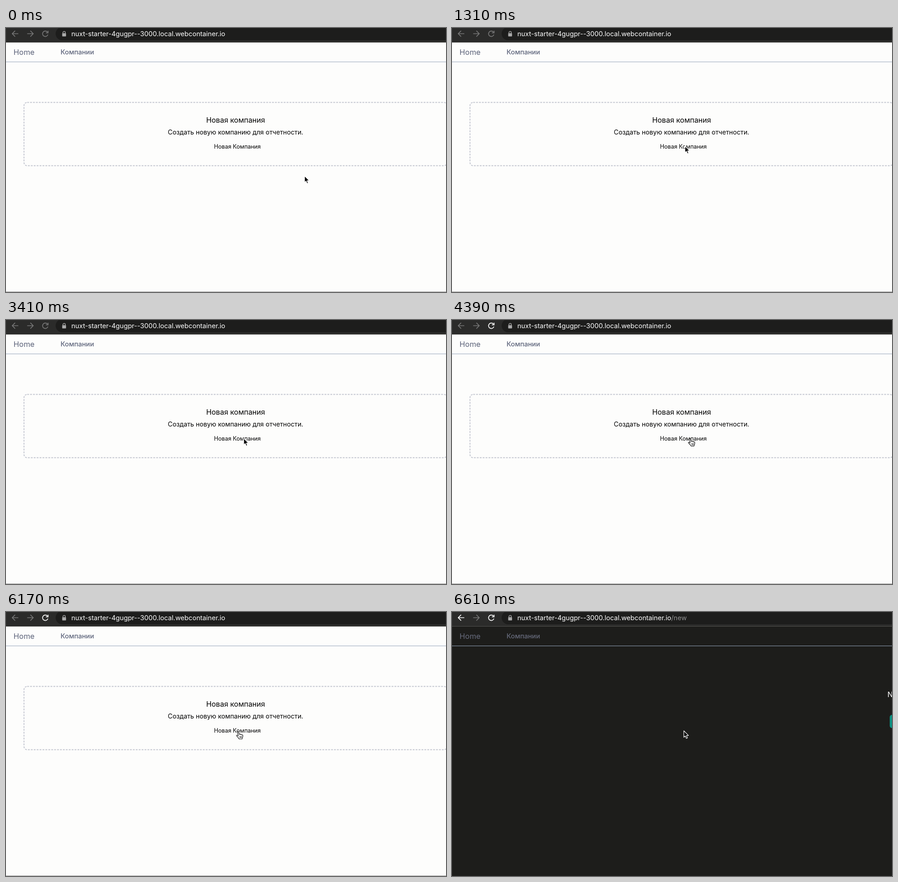
Write an HTML page that moves like this. It is 966 px wide and 580 px high and loops after 8 s.

```html
<!DOCTYPE html>
<html lang="ru">
<head>
<meta charset="utf-8">
<style>
  html, body { margin: 0; width: 100%; height: 100%; overflow: hidden; background: #fdfdfc; }
  svg { display: block; width: 966px; height: 580px; font-family: Inter, "Noto Sans", sans-serif; }
  .icon { fill: none; stroke: #777; stroke-width: 1.7; }
  .icon.on { stroke: #fff; }
  .mid { text-anchor: middle; }
  .nav { fill: #5c637a; }
  .dark .nav { fill: #676b7c; }
  .page { fill: #fdfdfc; }
  .dark .page { fill: #1d1d1b; }
  .rule { fill: #53534f; }
  .foot { fill: #929292; }
  .dark .foot { fill: #1d1d1b; }
  #next, .dark #list { display: none; }
  .dark #next { display: inline; }
</style>
</head>
<body>
<svg id="stage" viewBox="0 0 966 580">
  <rect class="page" width="966" height="580"/>

  <g id="toolbar">
    <rect width="966" height="31" fill="#2b2b2a"/>
    <rect class="rule" y="31" width="966" height="1"/>
    <rect x="109" y="-2" width="900" height="29" rx="14.5" fill="#1d1d1c"/>
    <path id="back" class="icon" d="M27 12.5H14M20 6.2L13.7 12.5L20 18.8"/>
    <path class="icon" d="M46.5 12.5H59.5M53.5 6.2L59.8 12.5L53.5 18.8"/>
    <g id="reload" class="icon">
      <path d="M91.2 9.2A6 6 0 1 0 92 14.4"/>
      <path d="M92.4 6V10.7H87.6" />
    </g>
    <path d="M125 12V10A2.6 2.6 0 0 1 130.2 10V12" fill="none" stroke="#aaa" stroke-width="1.4"/>
    <rect x="123.4" y="11.4" width="8.4" height="7" rx="1" fill="#aaa"/>
    <text x="143.5" y="17.8" font-size="14.6" fill="#fff">nuxt-starter-4gugpr--3000.local.webcontainer.io<tspan id="route" fill="#929292">/new</tspan></text>
  </g>

  <text class="nav" x="16.5" y="59.4" font-size="16.5">Home</text>
  <text class="nav" x="119.8" y="58.4" font-size="14.7" font-weight="500">Компании</text>
  <rect y="74" width="966" height="1" fill="#94a3b8"/>

  <g id="list">
    <rect x="39.5" y="163.5" width="929" height="139" rx="7" fill="none" stroke="#c3c6d0" stroke-width="2" stroke-dasharray="4 2.4"/>
    <text class="mid" x="504" y="208" font-size="16">Новая компания</text>
    <text class="mid" x="504" y="234" font-size="14.2">Создать новую компанию для отчетности.</text>
    <text class="mid" x="508" y="264.5" font-size="12.5">Новая Компания</text>
  </g>

  <g id="next">
    <text x="956" y="186.5" font-size="16" fill="#fff">N</text>
    <rect x="961" y="226" width="60" height="29" rx="5" fill="#0d8f80"/>
  </g>
  <rect class="foot" y="579" width="966" height="1"/>

  <g id="cursor" stroke-linejoin="round">
    <path id="arrow" fill="#000" stroke="#fff" stroke-width="1.2"
      d="M0 0V14.2L3.2 11.3L5.5 16.7L7.9 15.6L5.7 10.4H10.2Z"/>
    <g id="hand" stroke="#111" stroke-width="1.2" stroke-linecap="round">
      <path fill="#fff" d="M-.7 1.3C-.9 -.6 1.6 -1 2 1L3 6C3.6 4.6 5.6 5 5.7 6.3C6.8 5.2 8.2 5.8 8.4 7C9.8 6.4 11 7.2 11 8.6C11.2 11.5 10 13 9.4 16H2.8C1.6 13 -1 11.5 -3 9C-3.5 7.6 -1.8 7 .8 9.3Z"/>
      <path fill="none" stroke-width=".9" d="M4.2 10L4.6 13.4M6.3 10V13.4M8.3 10L8.1 13.4"/>
    </g>
  </g>
</svg>
<script>
const LOOP = 8000, FOCUS = 4200, HOVER = 4300, OPEN = 6350, ROUTED = 6450;

// Pointer path: time, x, y
const path = [
  [0, 655.5, 325], [360, 655.5, 325], [620, 565, 273], [850, 565, 273],
  [1310, 511.5, 259.5], [1690, 511.5, 259.5], [2430, 515, 259.5], [2530, 515, 259.5],
  [3270, 519, 260], [3370, 519, 260], [3410, 522, 260], [4630, 522, 261],
  [5090, 510.5, 262], [5470, 510.5, 262], [6170, 509, 263], [6349, 509, 263],
  [OPEN, 509, 261], [LOOP, 509, 261]
];

const el = id => document.getElementById(id);
const show = (id, on) => el(id).style.display = on ? "inline" : "none";
const ease = u => u * u * (3 - 2 * u);

function pointerAt(t) {
  const i = path.findIndex(p => p[0] > t);
  const [t0, x0, y0] = path[i - 1], [t1, x1, y1] = path[i];
  const u = ease((t - t0) / (t1 - t0));
  return [x0 + (x1 - x0) * u, y0 + (y1 - y0) * u];
}

function draw(now) {
  const t = now % LOOP;
  const hovering = t >= HOVER && t < OPEN;
  el("stage").classList.toggle("dark", t >= OPEN);
  el("reload").classList.toggle("on", t >= FOCUS);
  el("back").classList.toggle("on", t >= ROUTED);
  show("route", t >= ROUTED);
  show("hand", hovering);
  show("arrow", !hovering);
  el("cursor").setAttribute("transform", `translate(${pointerAt(t)})`);
}

const start = performance.now();
function tick() {
  draw(performance.now() - start);
  requestAnimationFrame(tick);
}
tick();
</script>
</body>
</html>
```
